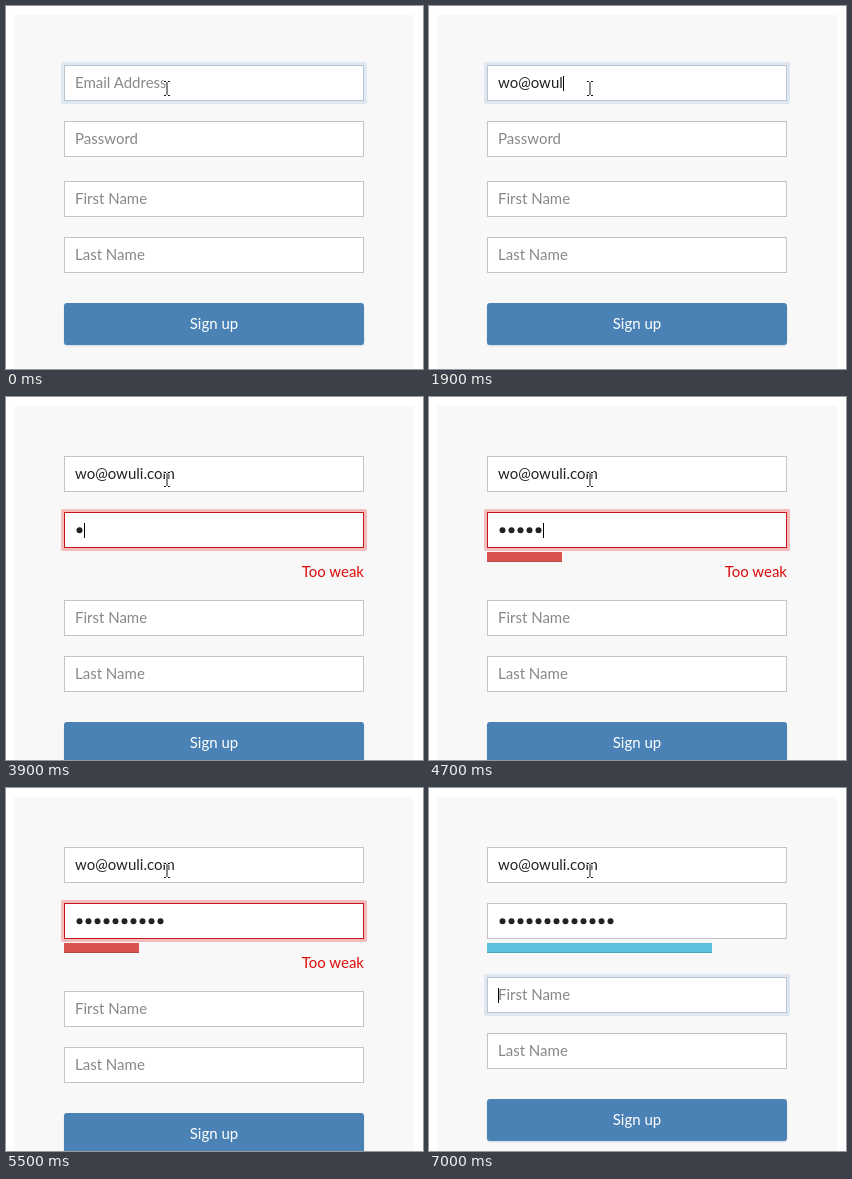
Animation, 417 px wide and 363 px high, one loop 8000 ms. Source, as an HTML page:

```html
<!DOCTYPE html>
<html lang="en">
<head>
<meta charset="utf-8">
<title>Sign up form</title>
<style>
html, body { margin: 0; width: 100%; height: 100%; overflow: hidden; background: #fff; }
svg { display: block; width: 417px; height: 363px; font: 15px Lato, sans-serif; }
</style>
</head>
<body>
<svg id="stage" viewBox="0 0 417 363">
  <rect x="8" y="9" width="400" height="354" fill="#f8f8f8"/>
  <g id="fields"></g>
  <g id="bar">
    <rect x="58" y="155" height="10"/>
    <rect x="58" y="164" height="1" fill="#000" fill-opacity=".15"/>
  </g>
  <text id="error" x="358" y="180" text-anchor="end" fill="#dc0a0a">Too weak</text>
  <g id="button">
    <rect x="57.5" y="298" width="301" height="42.5" rx="4" fill="#dde2e7"/>
    <rect x="58" y="297" width="300" height="42" rx="3" fill="#4b82b5"/>
    <text x="208" y="323" text-anchor="middle" fill="#fff">Sign up</text>
  </g>
  <rect id="caret" width="1" height="15" fill="#000"/>
  <g fill="none">
    <path d="M157.5 75.5h7M161 76v14M157.5 90.5h7" stroke="#fff" stroke-width="3" stroke-opacity=".8"/>
    <path d="M158 75.5h2M162 75.5h2M161 76v13M158 89.5h2M162 89.5h2" stroke="#111"/>
  </g>
</svg>
<script>
const LOOP = 8000, STEP = 100;
const EMAIL = 'wo@owuli.com';
const emailKeys = [600, 900, 1300, 1500, 1600, 1800, 1900, 2200, 2300, 2400, 2500, 2700];
const passwordKeys = [3900, 4100, 4300, 4500, 4700, 4900, 5000, 5100, 5200, 5300, 6000, 6200, 6400];
const RED = '#d9534f', ORANGE = '#f0ad4e', BLUE = '#5bc0de';

const byId = id => document.getElementById(id);
const show = (node, on) => node.setAttribute('visibility', on ? 'visible' : 'hidden');
const typed = (keys, t) => keys.filter(k => k <= t).length;
const between = (t, a, b) => t >= a && t < b;

function add(parent, tag, attrs, text = '') {
  const node = document.createElementNS('http://www.w3.org/2000/svg', tag);
  for (const key in attrs) node.setAttribute(key, attrs[key]);
  node.textContent = text;
  return parent.appendChild(node);
}

function makeField(label, y) {
  const group = add(byId('fields'), 'g', {});
  const glow = add(group, 'rect', { x: 55, y: -3, width: 306, height: 42, rx: 2 });
  const box = add(group, 'rect', { x: 58.5, y: .5, width: 299, height: 35, fill: '#fff' });
  const hint = add(group, 'text', { x: 69, y: 23, fill: '#888' }, label);
  return { group, glow, box, hint, y };
}

const fields = [
  makeField('Email Address', 59), makeField('Password', 115),
  makeField('First Name', 175), makeField('Last Name', 231)
];
const email = add(fields[0].group, 'text', { x: 69, y: 23, fill: '#222' });
const dots = passwordKeys.map((_, i) =>
  add(fields[1].group, 'circle', { cx: 73.5 + 9 * i, cy: 18.2, r: 3, fill: '#222' }));

// CSS "ease" curve: solve x(u) = p, return y(u)
function ease(p) {
  if (p <= 0 || p >= 1) return Math.min(1, Math.max(0, p));
  const curve = (a, b, u) => 3 * a * u * (1 - u) ** 2 + 3 * b * u * u * (1 - u) + u ** 3;
  let lo = 0, hi = 1;
  for (let i = 0; i < 25; i++) {
    const mid = (lo + hi) / 2;
    if (curve(.25, .25, mid) < p) lo = mid; else hi = mid;
  }
  return curve(.1, 1, lo);
}

const grow = (from, to, start, t) => from + (to - from) * ease((t - start) / 600);

function barAt(t) {
  if (t < 3900) return [0, RED];
  if (t >= 6000) return [grow(75, 225, 5867, t), BLUE];
  if (between(t, 5200, 5300)) return [76, ORANGE];
  return [grow(0, 75, 3900, t), RED];
}

function render(time) {
  const t = Math.floor(time / STEP) * STEP;
  const emailCount = typed(emailKeys, t), dotCount = typed(passwordKeys, t);
  const focus = t < 2900 ? 0 : t < 7000 ? 1 : 2;
  const weak = between(t, 2900, 6000) && !between(t, 5200, 5300);
  const error = weak && dotCount > 0;
  const shift = (dotCount ? 14 : 0) + (error ? 14 : 0);

  fields.forEach((field, i) => {
    const active = i === focus, invalid = active && weak;
    field.group.setAttribute('transform', `translate(0 ${field.y + (i > 1 ? shift : 0)})`);
    show(field.glow, active);
    field.glow.setAttribute('fill', invalid ? '#f5bcbc' : '#dfe8f0');
    field.box.setAttribute('stroke', invalid ? '#c8141e' : active ? '#b9c6d2' : '#c4c4c4');
  });
  show(fields[0].hint, !emailCount);
  show(fields[1].hint, !dotCount);
  email.textContent = EMAIL.slice(0, emailCount);
  dots.forEach((dot, i) => show(dot, i < dotCount));

  const [width, color] = barAt(t);
  for (const rect of byId('bar').children) rect.setAttribute('width', width);
  byId('bar').firstElementChild.setAttribute('fill', color);
  show(byId('error'), error);
  byId('button').setAttribute('transform', `translate(0 ${shift})`);

  const textWidth = [emailCount ? email.getComputedTextLength() : 0, dotCount * 9, 0][focus];
  const caret = byId('caret');
  caret.setAttribute('x', 69 + Math.round(textWidth));
  caret.setAttribute('y', fields[focus].y + 11 + (focus > 1 ? shift : 0));
  show(caret, t >= 600 && !between(t, 1100, 1300) && !between(t, 5500, 6000));
}

const start = performance.now();
function tick() {
  render((performance.now() - start) % LOOP);
  requestAnimationFrame(tick);
}
tick();
</script>
</body>
</html>
```
